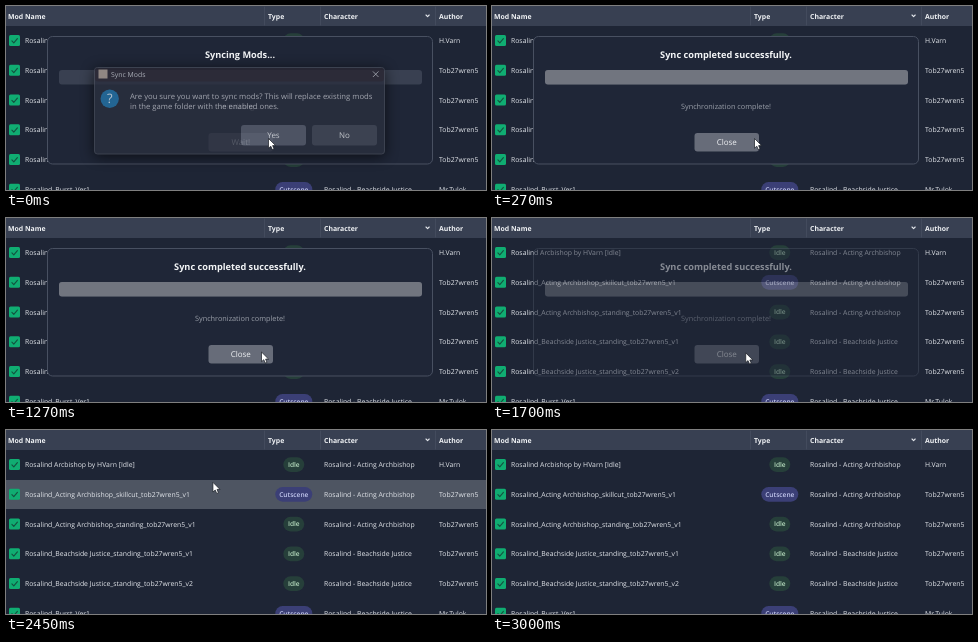
These frames come from a looping animation (480 by 184 pixels, 3360 ms). An HTML page:

```html
<!DOCTYPE html>
<html>
<head>
<meta charset="utf-8">
<style>
html, body { margin: 0; width: 100%; height: 100%; overflow: hidden; background: #1e2535; }
svg { display: block; width: 480px; height: 184px; }
text { font-family: "Open Sans", "Noto Sans", sans-serif; text-rendering: geometricPrecision; white-space: pre; }
.shadow { filter: drop-shadow(0 2px 7px #000c); }
</style>
</head>
<body>
<svg id="stage" viewBox="0 0 480 184"></svg>
<script>
const LOOP = 3360, PITCH = 29.75;
const rowTop = i => 20 + i * PITCH;

// y is the vertical middle of the line
const text = (x, y, s, size = 6.85, fill = '#e4e7ec', extra = 'font-weight="500"') =>
  `<text x="${x}" y="${y + size * 0.36}" font-size="${size}" fill="${fill}" ${extra}>${s}</text>`;
const box = (x, y, w, h, fill, r = 0, extra = '') =>
  `<rect x="${x}" y="${y}" width="${w}" height="${h}" rx="${r}" fill="${fill}" ${extra}/>`;
const line = (d, color, width = 1) =>
  `<path d="${d}" fill="none" stroke="${color}" stroke-width="${width}" stroke-linecap="round" stroke-linejoin="round"/>`;
const BOLD = 'font-weight="700"', SEMI = 'font-weight="600"', MID = 'text-anchor="middle"';

const hero = 'Rosalind', maker = 'tob27wren5', Maker = 'Tob27wren5';
const rows = [
  [`${hero} Arcbishop by HVarn [Idle]`, 'Idle', 'Acting Archbishop', 'H.Varn'],
  [`${hero}_Acting Archbishop_skillcut_${maker}_v1`, 'Cutscene', 'Acting Archbishop', Maker],
  [`${hero}_Acting Archbishop_standing_${maker}_v1`, 'Idle', 'Acting Archbishop', Maker],
  [`${hero}_Beachside Justice_standing_${maker}_v1`, 'Idle', 'Beachside Justice', Maker],
  [`${hero}_Beachside Justice_standing_${maker}_v2`, 'Idle', 'Beachside Justice', Maker],
  [`${hero}_Burst_Ver1`, 'Cutscene', 'Beachside Justice', 'Mr.Tulok']
];

function pill(kind, y) {
  const idle = kind === 'Idle', w = idle ? 21 : 37;
  return box(287.8 - w / 2, y - 7.3, w, 14.6, idle ? '#263f3a' : '#3b3f76', 7.3) +
    text(287.8, y, kind, 6.6, idle ? '#b9dfc0' : '#c5caf0', `${MID} ${SEMI}`);
}

function row([name, kind, outfit, author], i) {
  const y = rowTop(i) + 14.6;
  return box(3, y - 5.5, 11, 11, '#10ad72', 1.5) +
    line(`M5.9 ${y + .2}l1.9 2 3.6-4.2`, '#14513f', 1.1) +
    text(19, y, name) + pill(kind, y) +
    text(318, y, `${hero} - ${outfit}`) + text(433, y, author);
}

const header = box(0, 0, 480, 20, '#384052') +
  [258.5, 314.5, 429.5].map(x => line(`M${x} 1V19`, '#434b5d')).join('') +
  [[2, 'Mod Name'], [262, 'Type'], [318, 'Character'], [433, 'Author']]
    .map(([x, s]) => text(x, 10.3, s, 6.9, '#f0f2f5', BOLD)).join('') +
  line('M420 9l1.6 1.6 1.6-1.6', '#e4e7ec', 1.1);

const panel = box(41.5, 30.5, 385, 127.5, '#1f2637', 5, 'stroke="#485061"');
const button = (x, y, w, h, s, fill, size = 8) =>
  box(x, y, w, h, fill, 3) + text(x + w / 2, y + h / 2, s, size, '#eef0f3', MID);

const confirm =
  box(88.5, 61.5, 290, 86.5, '#2a2f3e', 3, 'stroke="#454a57" class="shadow"') +
  box(89, 62, 289, 13.5, '#292632', 3) +
  box(92.5, 63.5, 9, 9, '#a99b92') +
  text(105, 68.5, 'Sync Mods', 6.9, '#c9ccd2') +
  line('M367.2 65.7l5 5m0-5l-5 5', '#c9ccd2', .8) +
  '<circle cx="103.7" cy="92.8" r="9.2" fill="#2577ad"/>' +
  text(103.7, 92.6, '?', 13, '#e2eff8', MID) +
  text(124, 89.8, 'Are you sure you want to sync mods? This will replace existing mods', 7.68, '#c6c9d0', '') +
  text(124, 100, 'in the game folder with the enabled ones.', 7.68, '#c6c9d0', '') +
  button(235, 119, 65, 20.5, 'Yes', '#5a6070') +
  button(306, 119, 65, 20.5, 'No', '#454b59');

function syncPanel(t) {
  const done = t >= 210;
  const fill = Math.min(1, Math.max(0, (t - 90) / 120));
  return panel +
    text(234, 49, done ? 'Sync completed successfully.' : 'Syncing Mods...', 9.2, '#f2f4f6', `${MID} ${BOLD}`) +
    box(53, 64, 363, 14.5, '#394051', 3) +
    (fill ? box(53, 64, 363 * fill, 14.5, '#71757f', 3) : '') +
    text(234, 100, done ? 'Synchronization complete!' : 'Initializing...', 7.3, '#9a9fa9', MID) +
    button(202.5, 127, 64.5, 18.5, done ? 'Close' : 'Wait!', done ? '#676c79' : '#4a5162');
}

// time, x, y of the pointer tip
const path = [
  [0, 262, 132], [550, 262, 132], [700, 261.5, 132], [1180, 261, 132.5], [1270, 255, 133.5],
  [1760, 253, 134.5], [2000, 252, 135], [2260, 251, 134], [2340, 238, 104],
  [2450, 207, 52], [2620, 110, 25], [2790, -10, 13]
];
function pointerAt(t) {
  const k = path.findIndex(p => p[0] > t);
  if (k < 0) return null;
  const [a, b] = [path[k - 1], path[k]], u = (t - a[0]) / (b[0] - a[0]);
  return [a[1] + (b[1] - a[1]) * u, a[2] + (b[2] - a[2]) * u];
}
const pointer = ([x, y]) => `<path transform="translate(${x} ${y})" d="M.5 .5V10.2L2.8 8.2 4.3 11.6 6 10.9 4.6 7.6H7.6Z" fill="#fff" stroke="#161a22" stroke-width=".7"/>`;

const fade = (t, from, to) => Math.min(1, Math.max(0, (to - t) / (to - from)));
const group = (s, opacity) => opacity > 0 ? `<g opacity="${opacity}">${s}</g>` : '';

const stage = document.getElementById('stage');
const table = rows.map(row).join('') + header;

function draw(now) {
  const t = now % LOOP, tip = pointerAt(t);
  const hovered = tip && t >= 1760 ? Math.floor((tip[1] - 20) / PITCH) : -1;
  stage.innerHTML = box(0, 0, 480, 184, '#1e2535') +
    (hovered >= 0 ? box(0, Math.round(rowTop(hovered)), 480, 29, '#4e5562') : '') +
    table +
    group(syncPanel(t), fade(t, 1640, 1760)) +
    group(confirm, .78 * fade(t, 30, 120)) +
    (tip ? pointer(tip) : '');
  requestAnimationFrame(draw);
}
requestAnimationFrame(draw);
</script>
</body>
</html>
```
